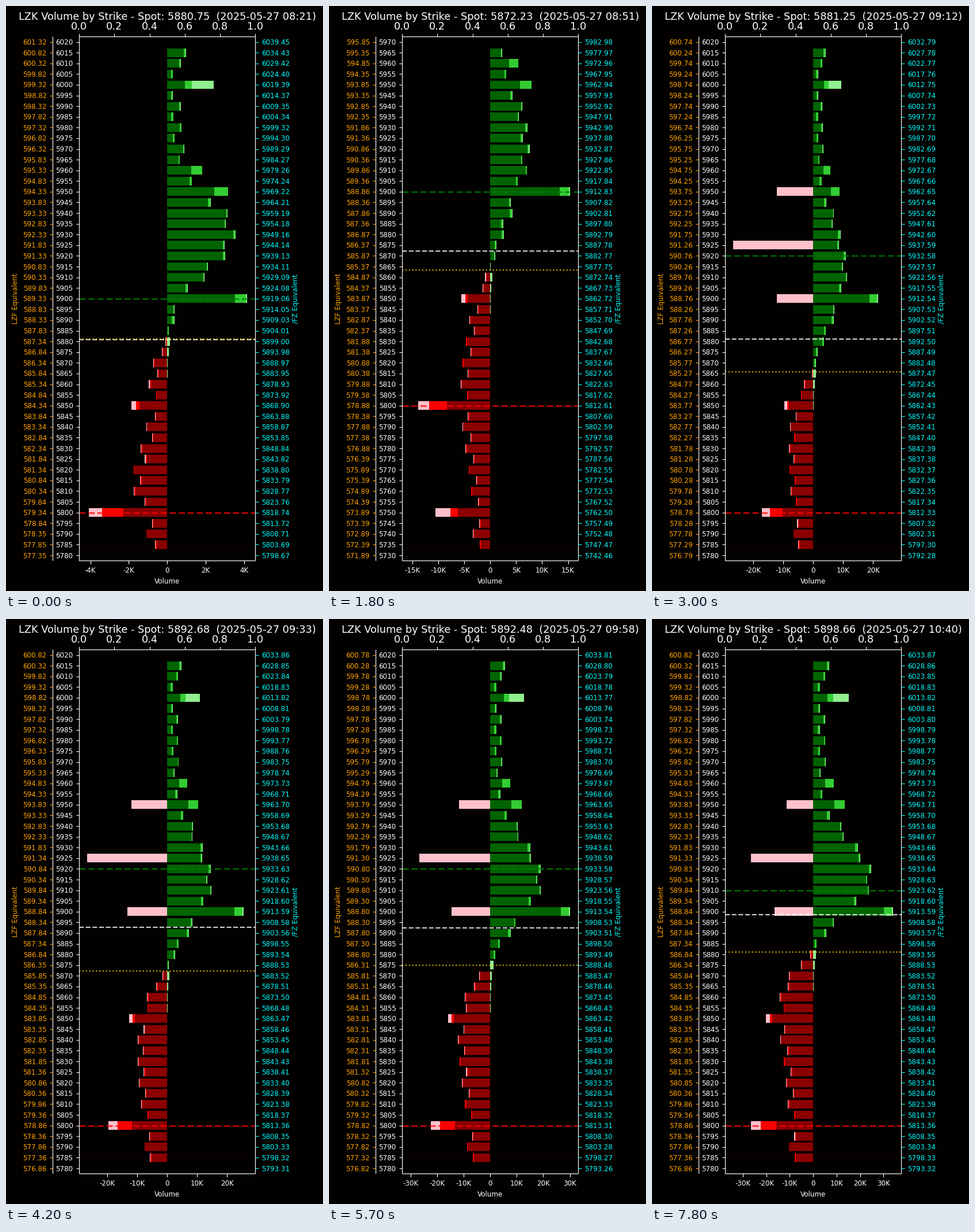
A matplotlib script for the animation above (8 s loop, 551 by 1017 pixels).

```python
import numpy as np
import matplotlib.pyplot as plt
from matplotlib.animation import FuncAnimation
from matplotlib.patches import Rectangle

W, H = 551, 1017
LEFT, RIGHT, TOP, BOTTOM = 127.0, 433.4, 53.3, 964.3
ZERO, HALF = (LEFT + RIGHT) / 2, (RIGHT - LEFT) / 2
ROWS = 49
STEP = (BOTTOM - TOP) / ROWS
PT = 0.72            # points per pixel at 100 dpi
SMALL, LARGE = 11.83 * PT, 17.75 * PT
STEPS, STEP_MS, TICK_MS, LOOP_MS = 27, 300, 100, 8000

plt.rcParams["font.family"] = "DejaVu Sans"

# Market readings at a few steps; straight lines between them
KEYS = [0, 6, 10, 14, 19, 22, 26]
MINUTE = [501, 531, 552, 573, 598, 614, 640]
SPOT = [5880.75, 5872.23, 5881.25, 5892.68, 5892.48, 5893.52, 5898.66]
FLIP = [5881, 5863.5, 5865.8, 5872.2, 5875, 5876, 5881.1]
FUND = [.09988692, .09980705, .09979005, .09980347, .0997967, .0998011, .09980318]
FUTURE = [1.0032309, 1.00217465, 1.00212535, 1.002303, 1.00229443, 1.0022871, 1.0023038]

# Extra volume (thousands) on popular strikes, with its middle and outer share
SPIKES = {6015: (4, 0, .05), 6000: (10, .15, .65), 5960: (3, .9, 0),
          5950: (6, .6, 0), 5900: (18.8, .15, .02), 5850: (5, .15, .25),
          5800: (16, .4, .25), 5750: (14, .2, .4)}
# Block trades in puts: first and last size
BLOCKS = {5950: (12.1, 11.3), 5925: (26.8, 26.6), 5900: (12.1, 16.5)}
BLOCK_STEP = 8
TRIM = np.random.default_rng(4).random((100, 2))


def reading(k, values):
    return np.interp(k, KEYS, values)


def trend(k, *values):
    return np.interp(k, [0, 6, 10, 26], values)


def hill(x, center, width, height, floor):
    return floor + height * np.exp(-.5 * ((x - center) / width) ** 2)


def book(k, strikes):
    """Outer ends of dark, middle and light segments: three call, three put columns."""
    dist = strikes - reading(k, FLIP)
    calls = dist > 0
    growth = trend(k, .17, .51, .63, 1)
    call = hill(strikes, trend(k, 5930, 5920, 5912, 5914), trend(k, 17, 24, 22, 17),
                trend(k, 2.9, 5, 8.5, 22), trend(k, .3, 1.4, 1.6, 2.8))
    put = hill(strikes, trend(k, 5815, 5805, 5830, 5855), trend(k, 12, 25, 25, 20),
               trend(k, .8, 2.5, 2, 5), trend(k, .6, 2, 4.6, 8))
    tens = 2.4 * growth * (strikes % 10 == 0)
    gate = np.tanh(abs(dist) / np.where(calls, 20, 12))
    spike, mid_share, light_share = np.array(
        [SPIKES.get(s, (0, 0, 0)) for s in strikes]).T
    spike = spike * growth
    total = (np.where(calls, call, put) + tens) * gate + spike

    blocks = np.zeros(len(strikes))
    if k >= BLOCK_STEP:
        blocks = np.array([np.interp(k, [10, 26], BLOCKS.get(s, (0, 0))) for s in strikes])
    peak = max(total.max(), blocks.max())

    trim = TRIM[strikes // 5 % 100]
    mid = peak * (.004 + .022 * trim[:, 0]) * np.where(calls, 1, .6) + spike * mid_share
    light = peak * .009 * trim[:, 1] + spike * light_share
    side = np.stack([np.maximum(total - mid - light, total * .15),
                     np.maximum(total - light, total * .2), total], axis=1)
    ends = np.hstack([side * calls[:, None], side * ~calls[:, None]])
    ends[:, 5] += blocks
    ends[:, 2] += np.where(calls, 0, .04 * peak * np.exp(-abs(dist) / 7))
    return ends, 1.1 * peak


fig = plt.figure(figsize=(W / 100, H / 100), dpi=100, facecolor="#030000")
ax = fig.add_axes([0, 0, 1, 1])
ax.set_xlim(0, W)
ax.set_ylim(H, 0)
ax.axis("off")


def line(x0, y0, x1, y1, color="white", width=1.18, **kw):
    kw.setdefault("zorder", 4)
    return ax.plot([x0, x1], [y0, y1], color=color, lw=width * PT,
                   solid_capstyle="butt", **kw)[0]


def label(x, y, s="", color="white", size=SMALL, ha="center", **kw):
    return ax.text(x, y, s, color=color, fontsize=size, ha=ha, va="baseline", **kw)


def level_line(color, width, style, alpha):
    return line(LEFT, 0, RIGHT, 0, color, width, ls=style, alpha=alpha, zorder=3)


def slot_y(n):
    return TOP + STEP * (n + .5)


# Frame, side scales and fixed labels
line(LEFT, slot_y(47), RIGHT, slot_y(47), "#160000", 1, zorder=1)
for x in (81.3, LEFT, RIGHT):
    line(x, TOP, x, BOTTOM)
for y in (TOP, BOTTOM):
    line(LEFT, y, RIGHT, y)
for n in range(6):
    x = LEFT + (RIGHT - LEFT) * n / 5
    line(x, TOP - 5.2, x, TOP)
    label(x, 41, f"{n / 5:.1f}", size=LARGE)
label(ZERO, 1004, "Volume")
for x, name, color in ((19.6, "LZF", "orange"), (507.5, "/FZ", "cyan")):
    label(x, (TOP + BOTTOM) / 2, name + " Equivalent", color,
          rotation=90, rotation_mode="anchor")
title = label(ZERO, 24.4, size=LARGE)

fund_labels, strike_labels, future_labels = [], [], []
for n in range(ROWS):
    y = slot_y(n)
    line(76.1, y, 81.3, y, "orange")
    line(LEFT - 5.2, y, LEFT, y)
    line(RIGHT, y, RIGHT + 5.2, y, "cyan")
    fund_labels.append(label(70.9, y + 4.5, color="orange", ha="right"))
    strike_labels.append(label(116.6, y + 4.5, ha="right"))
    future_labels.append(label(443.8, y + 4.5, color="cyan", ha="left"))

COLORS = ["darkgreen", "limegreen", "lightgreen", "darkred", "red", "pink"]
bars = []
for n in range(1, ROWS - 1):
    group = [Rectangle((ZERO, slot_y(n) - .4 * STEP), 0, .8 * STEP, fc=color, lw=0,
                       zorder=2 - .1 * (c % 3)) for c, color in enumerate(COLORS)]
    for bar in group:
        ax.add_patch(bar)
    bars.append(group)

call_wall = level_line("green", 2.96, "--", .7)
put_wall = level_line("red", 2.96, "--", .7)
spot_line = level_line("white", 2.2, "--", .8)
flip_line = level_line("gold", 2.2, ":", .8)
ticks = [(n, line(ZERO, BOTTOM, ZERO, BOTTOM + 5.2), label(ZERO, 985))
         for n in range(-4, 5)]


def tick_step(limit):
    return next(s for s in (1, 2, 2.5, 5, 10, 20) if 2 * limit / s <= 8)


def draw(i):
    k = min(i * TICK_MS // STEP_MS, STEPS - 1)
    minute, spot, flip, fund, future = (
        reading(k, v) for v in (MINUTE, SPOT, FLIP, FUND, FUTURE))
    minute = int(round(minute))
    top = int(round(spot / 50)) * 50 + 120
    strikes = top - 5 * np.arange(ROWS)

    title.set_text(f"LZK Volume by Strike - Spot: {spot:.2f}  "
                   f"(2025-05-27 {minute // 60:02d}:{minute % 60:02d})")
    for n, strike in enumerate(strikes):
        fund_labels[n].set_text(f"{strike * fund:.2f}")
        strike_labels[n].set_text(str(strike))
        future_labels[n].set_text(f"{strike * future:.2f}")

    volume, limit = book(k, strikes[1:-1])
    scale = HALF / limit
    for group, ends in zip(bars, volume * scale):
        for c, (bar, end) in enumerate(zip(group, ends)):
            bar.set_width(end if c < 3 else -end)
            bar.set_visible(end > .3)

    wall = 5900 if k < BLOCK_STEP else 5920 if k < 24 else 5910
    for mark, price in ((call_wall, wall), (put_wall, 5800),
                        (spot_line, spot), (flip_line, flip)):
        y = slot_y((top - price) / 5)
        mark.set_ydata([y, y])

    step = tick_step(limit)
    for n, mark, text in ticks:
        value = n * step
        x = ZERO + value * scale
        mark.set_xdata([x, x])
        text.set_x(x)
        text.set_text(f"{value:g}K" if n else "0")
        for artist in (mark, text):
            artist.set_visible(abs(value) <= limit)
    return []


anim = FuncAnimation(fig, draw, frames=LOOP_MS // TICK_MS, interval=TICK_MS,
                     init_func=lambda: draw(0), repeat=True, repeat_delay=0, blit=False)
plt.show()
```
